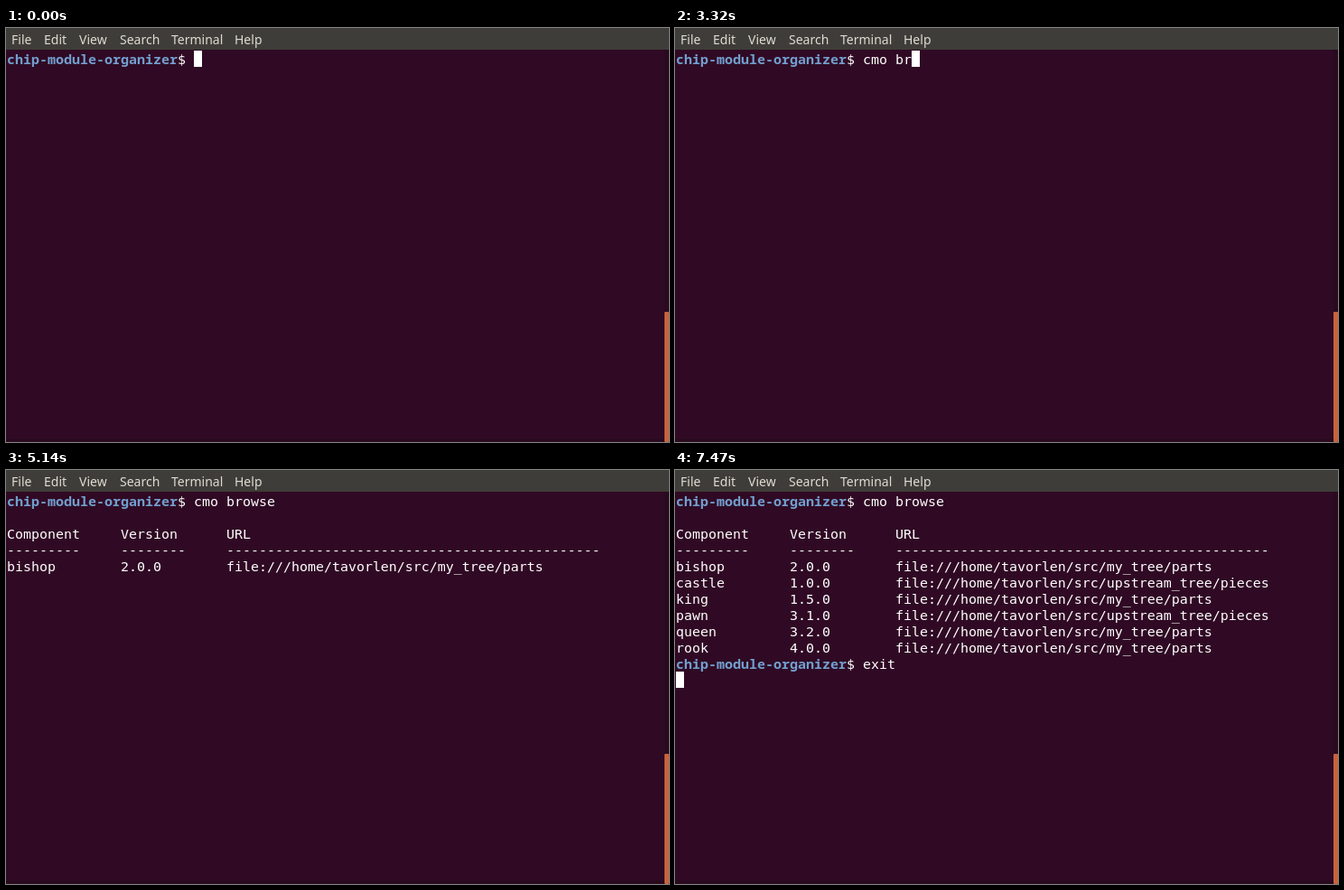
These frames come from a looping animation (734 by 458 pixels, 8.47 s). An HTML page:

```html
<!DOCTYPE html>
<html lang="en">
<head>
<meta charset="utf-8">
<title>Terminal</title>
<style>
  html, body { margin: 0; width: 100%; height: 100%; overflow: hidden; background: #300a24; }
  svg { display: block; width: 734px; height: 458px; }
  text { white-space: pre; }
  .menu { font: 14px "Noto Sans", sans-serif; fill: #dfdbd2; }
  .screen { font: 14.95px "DejaVu Sans Mono", monospace; font-variant-ligatures: none; fill: #fff; }
  .prompt { font: 700 15px "Noto Sans Mono", monospace; fill: #729fcf; }
</style>
</head>
<body>
<svg viewBox="0 0 734 458">
  <rect width="734" height="458" fill="#300a24"/>
  <path d="M729 24h5v434H0v-4h729z" fill="#290a1f"/>
  <rect x="729" y="314" width="5" height="144" rx="1" fill="#c8633c"/>
  <rect width="734" height="24" fill="#3e3d39"/>
  <g class="menu">
    <text x="6" y="18">File</text>
    <text x="42" y="18">Edit</text>
    <text x="81" y="18">View</text>
    <text x="126" y="18">Search</text>
    <text x="183" y="18">Terminal</text>
    <text x="253" y="18">Help</text>
  </g>
  <g class="screen" id="screen"></g>
  <rect id="cursor" width="9" height="18" fill="#fff"/>
</svg>
<script>
const LOOP = 8470, CELL = 9, ROW = 18, LEFT = 1, TOP = 25, BASELINE = 15;
const PROMPT = "chip-module-organizer";
const INPUT_COL = PROMPT.length + 2;
const COMMAND = "cmo browse";
const KEY_TIMES = [1290, 1520, 1650, 2440, 2640, 3320, 3540, 3980, 4310, 4390];
const ENTER = 4390, DONE = 5560, EXIT = 7470;

const HOME = "file:///home/tavorlen/src/";
const OWN = HOME + "my_tree/parts";
const SHARED = HOME + "upstream_tree/pieces";

// Output lines: time, then the three columns
const OUTPUT = [
  [4940, "Component", "Version", "URL"],
  [5040, "-".repeat(9), "-".repeat(8), "-".repeat(46)],
  [5115, "bishop", "2.0.0", OWN],
  [5190, "castle", "1.0.0", SHARED],
  [5265, "king", "1.5.0", OWN],
  [5340, "pawn", "3.1.0", SHARED],
  [5440, "queen", "3.2.0", OWN],
  [DONE, "rook", "4.0.0", OWN]
];

const screen = document.getElementById("screen");
const cursor = document.getElementById("cursor");
const timed = [];
const cellX = col => LEFT + col * CELL;
const cellY = row => TOP + row * ROW;

function addText(col, row, string, at = 0, className = "") {
  const el = document.createElementNS("http://www.w3.org/2000/svg", "text");
  el.setAttribute("x", cellX(col));
  el.setAttribute("y", cellY(row) + BASELINE);
  el.setAttribute("class", className);
  el.textContent = string;
  screen.append(el);
  timed.push({ el, at });
}

function addPrompt(row, at) {
  addText(0, row, PROMPT, at, "prompt");
  addText(PROMPT.length, row, "$", at);
}

addPrompt(0, 0);
[...COMMAND].forEach((key, i) => addText(INPUT_COL + i, 0, key, KEY_TIMES[i]));
OUTPUT.forEach(([at, name, version, url], i) => {
  addText(0, i + 2, name, at);
  addText(14, i + 2, version, at);
  addText(27, i + 2, url, at);
});
addPrompt(10, DONE);
addText(INPUT_COL, 10, "exit", EXIT);

function cursorCell(t) {
  if (t >= EXIT) return [0, 11];
  if (t >= DONE) return [INPUT_COL, 10];
  if (t >= ENTER) return null;
  return [INPUT_COL + KEY_TIMES.filter(at => at <= t).length, 0];
}

function render(t) {
  for (const { el, at } of timed) el.style.visibility = t >= at ? "visible" : "hidden";
  const cell = cursorCell(t);
  cursor.style.visibility = cell ? "visible" : "hidden";
  if (cell) {
    cursor.setAttribute("x", cellX(cell[0]));
    cursor.setAttribute("y", cellY(cell[1]));
  }
}

const start = performance.now();
function tick() {
  render((performance.now() - start) % LOOP);
  requestAnimationFrame(tick);
}
tick();
</script>
</body>
</html>
```
